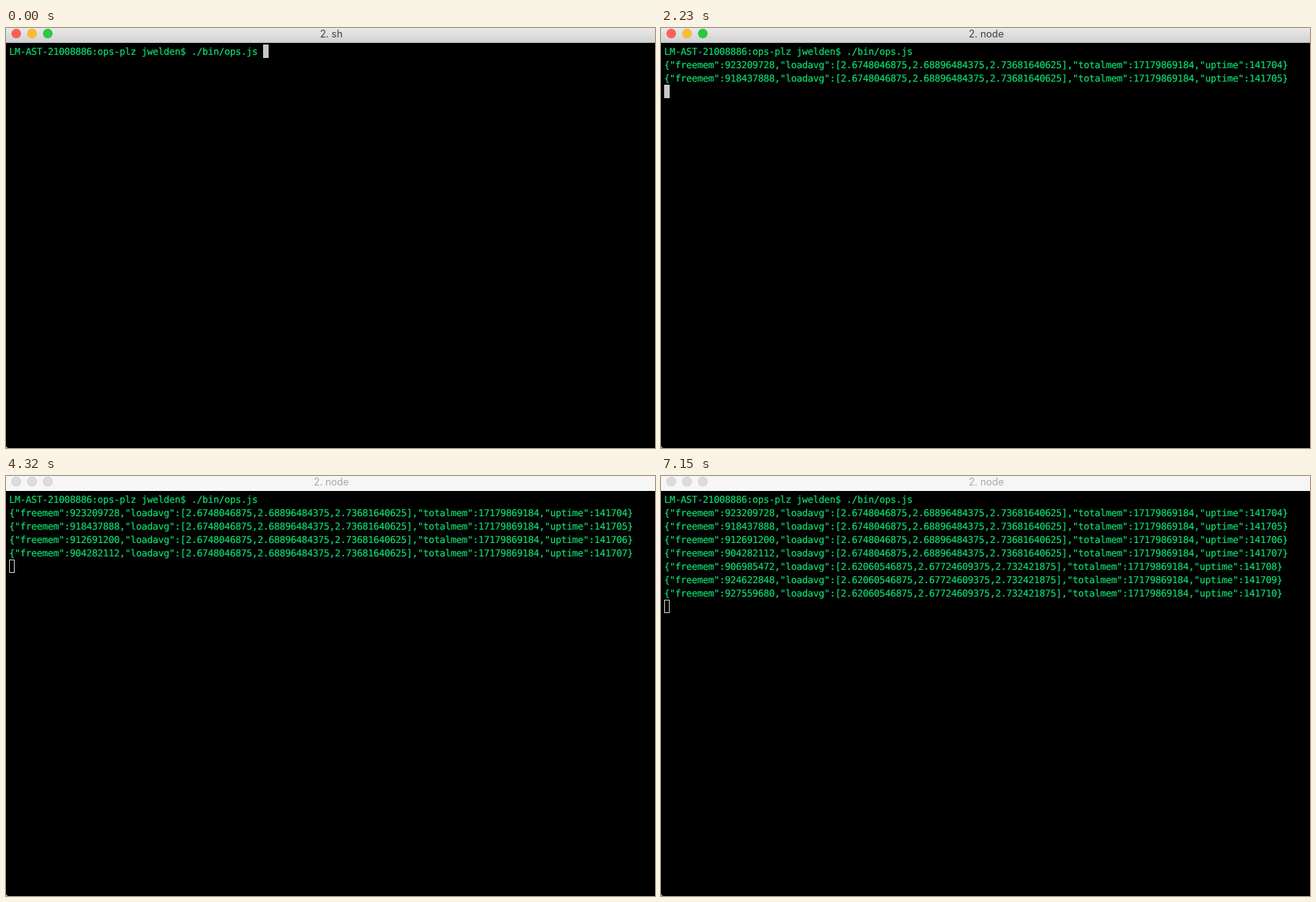
Write an HTML page that moves like this. It is 823 px wide and 533 px high and loops after 8000 ms.

```html
<!DOCTYPE html>
<html lang="en">
<head>
<meta charset="utf-8">
<title>Terminal</title>
<style>
html, body { margin: 0; width: 100%; height: 100%; overflow: hidden; background: #000; }
#stage { position: relative; width: 823px; height: 533px; overflow: hidden; background: #000; }
#stage > * { position: absolute; }
#bar {
  left: 0; top: 0; width: 823px; height: 19px; box-sizing: border-box;
  background: linear-gradient(#e9e9e9, #d2d2d2); border-bottom: 1px solid #b4b4b4;
}
#title {
  left: 0; top: 0; width: 825px; height: 15px; text-align: center; color: #424242;
  font: 12.5px/15px Inter, "Open Sans", sans-serif;
}
.light { top: 1px; width: 12px; height: 12px; border-radius: 50%; box-shadow: inset 0 0 0 .5px #0002; }
/* 12px type set on the terminal's 7px cell grid */
#log {
  left: 4px; top: 22px; margin: 0; color: #0fdc70; white-space: pre;
  font: 12px/17px "DejaVu Sans Mono", monospace; letter-spacing: -.2246px;
  -webkit-text-stroke: .2px; font-variant-ligatures: none; text-rendering: geometricPrecision;
}
#caret { width: 7px; height: 17px; box-sizing: border-box; background: #c7c7c7; }
#corner { left: 0; top: 531px; width: 2px; height: 2px; background: linear-gradient(45deg, #999 50%, #000 50%); }
.idle #bar { background: #f6f6f6; border-color: #f6f6f6; }
.idle #title { color: #a8a8a8; }
.idle .light { background: #dcdcdc !important; }
.idle #caret { background: none; border: 1px solid #c7c7c7; }
</style>
</head>
<body>
<div id="stage">
  <div id="bar"></div>
  <div class="light" style="left:7px;background:#ff5f57"></div>
  <div class="light" style="left:27px;background:#ffbd2e"></div>
  <div class="light" style="left:47px;background:#28ca41"></div>
  <div id="title"></div>
  <pre id="log"></pre>
  <div id="caret"></div>
  <svg id="pointer" width="11" height="17" viewBox="0 0 11 17">
    <path d="M.6 1.2V13.6L3.5 10.9 5.6 16 7.8 15.1 5.7 10.1H10.1Z" fill="#000" stroke="#fff"/>
  </svg>
  <div id="corner"></div>
</div>
<script>
const LOOP = 8000, CELL = 7, LINE = 17, LEFT = 4, TOP = 21;
const PROMPT = "LM-AST-21008886:ops-plz jwelden$ ./bin/ops.js ";
const EARLY = [2.6748046875, 2.68896484375, 2.73681640625];
const LATE = [2.62060546875, 2.67724609375, 2.732421875];

// Each sample: time printed, free memory
const samples = [
  [1190, 923209728], [2230, 918437888], [3130, 912691200], [4170, 904282112],
  [5210, 906985472], [6260, 924622848], [7150, 927559680]
].map(([at, freemem], i) => ({
  at,
  text: JSON.stringify({ freemem, loadavg: i < 4 ? EARLY : LATE, totalmem: 17179869184, uptime: 141704 + i })
}));

const el = id => document.getElementById(id);
const stage = el("stage"), title = el("title"), log = el("log"), caret = el("caret"), pointer = el("pointer");

function place(node, x, y) {
  node.style.left = x + "px";
  node.style.top = y + "px";
}

function draw(t) {
  const shown = samples.filter(s => t >= s.at);
  const text = [PROMPT, ...shown.map(s => s.text)].join("\n");
  if (log.textContent !== text) log.textContent = text;
  title.textContent = t < 1640 ? "2. sh" : "2. node";
  stage.className = t < 3570 ? "" : "idle";

  if (t < 140) place(caret, LEFT + PROMPT.length * CELL, TOP);
  else place(caret, LEFT, TOP + (shown.length + 1) * LINE);

  pointer.style.display = t >= 4020 && t < 4320 ? "block" : "none";
  if (t < 4170) place(pointer, 737, 451);
  else place(pointer, 740, 430);
}

const start = performance.now();
function tick() {
  draw((performance.now() - start) % LOOP);
  requestAnimationFrame(tick);
}
tick();
</script>
</body>
</html>
```
